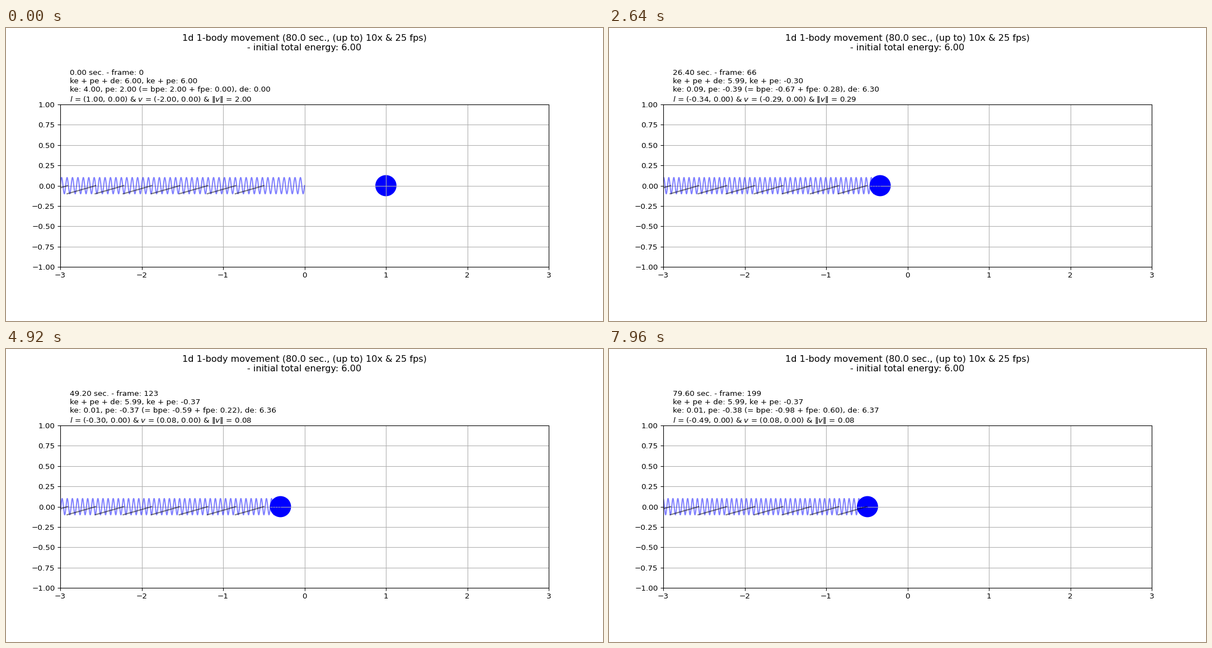
A matplotlib script that plays this animation: 1067 by 525 pixels, repeating every 8 s.

```python
import numpy as np
import matplotlib.pyplot as plt
from matplotlib.animation import FuncAnimation

FRAMES, INTERVAL, SPEED = 200, 40, 10
STEP = INTERVAL / 1000 * SPEED
SUBSTEPS = 200

MASS, GRAVITY = 2.0, 1.0
STIFF, DAMP = 5.0, 1.004
SPRING_TOP, DAMP_TOP = 0.0, -0.5
FAR = -5.0
COILS = 75
LOSS_SCALE = 0.9988

WIDTH, HEIGHT = 11, 5.4125  # inches


def accel(x, v):
    force = -MASS * GRAVITY
    if x < SPRING_TOP:
        force -= STIFF * x
    if x < DAMP_TOP:
        force -= DAMP * v
    return force / MASS


def advance(x, v, h):
    """One Runge-Kutta step."""
    a1 = accel(x, v)
    v2 = v + h / 2 * a1
    a2 = accel(x + h / 2 * v, v2)
    v3 = v + h / 2 * a2
    a3 = accel(x + h / 2 * v2, v3)
    v4 = v + h * a3
    a4 = accel(x + h * v3, v4)
    return x + h / 6 * (v + 2 * v2 + 2 * v3 + v4), v + h / 6 * (a1 + 2 * a2 + 2 * a3 + a4)


def simulate(x=1.0, v=-2.0):
    states = [(x, v)]
    for _ in range(FRAMES - 1):
        for _ in range(SUBSTEPS):
            x, v = advance(x, v, STEP / SUBSTEPS)
        states.append((x, v))
    return states


def energies(x, v):
    ke = MASS * v * v / 2
    bpe = MASS * GRAVITY * x
    fpe = STIFF * min(x, SPRING_TOP) ** 2 / 2
    return ke, bpe, fpe


states = simulate()
total = sum(energies(*states[0]))

fig = plt.figure(figsize=(WIDTH, HEIGHT), dpi=97)
fig.suptitle(f"1d 1-body movement (80.0 sec., (up to) 10x & 25 fps)\n"
             f"- initial total energy: {total:.2f}")
# one-inch margins around a 9 x 3 inch plot
ax = fig.add_axes([1 / WIDTH, 1 / HEIGHT, 9 / WIDTH, 3 / HEIGHT])
ax.set_xlim(-3, 3)
ax.set_ylim(-1, 1)
ax.grid(True)

ball = ax.add_patch(plt.Circle((1, 0), 0.13, color="b", lw=0))
spring, = ax.plot([], [], color="b", alpha=0.5)
damper, = ax.plot([], [], color="k", alpha=0.5)
info = ax.text(0.02, 1.02, "", transform=ax.transAxes)

unit = np.linspace(0, 1, 3001)
wave = 0.1 * np.sin(2 * np.pi * COILS * (unit - 1))


def slats(end):
    """Slanted strokes hanging below the axis, squeezed when pushed."""
    scale = (end - FAR) / (DAMP_TOP - FAR)
    right = end - 0.3443 * scale * np.arange(13)
    left = right - 0.35 * scale
    gap = np.full_like(right, np.nan)
    xs = np.column_stack([left, right, gap]).ravel()
    return xs, np.tile([-0.1, 0.0, np.nan], len(right))


def update(i):
    x, v = states[i]
    ke, bpe, fpe = energies(x, v)
    pe = bpe + fpe
    de = LOSS_SCALE * max(total - ke - pe, 0)
    ball.center = (x, 0)
    end = min(x, SPRING_TOP)
    spring.set_data(FAR + (end - FAR) * unit, wave)
    damper.set_data(*slats(min(x, DAMP_TOP)))
    info.set_text(
        f"{i * STEP:.2f} sec. - frame: {i}\n"
        f"ke + pe + de: {ke + pe + de:.2f}, ke + pe: {ke + pe:.2f}\n"
        f"ke: {ke:.2f}, pe: {pe:.2f} (= bpe: {bpe:.2f} + fpe: {fpe:.2f}), de: {de:.2f}\n"
        f"$l$ = ({x:.2f}, 0.00) & $v$ = ({v:.2f}, 0.00) & $\\Vert v\\Vert$ = {abs(v):.2f}")
    return ball, spring, damper, info


anim = FuncAnimation(fig, update, frames=FRAMES, interval=INTERVAL, repeat=True, repeat_delay=0)
plt.show()
```
